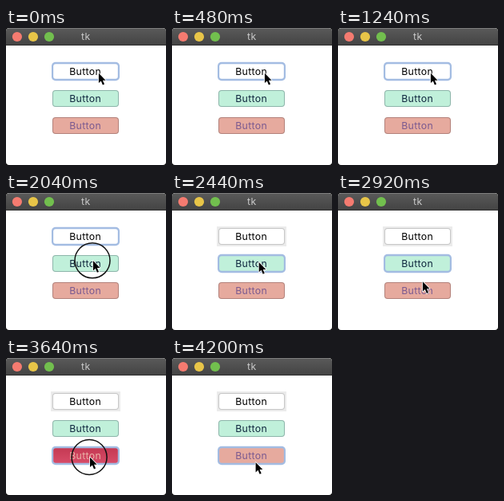
Recreate the animation shown at these times as an HTML page with a canvas. Size 200 by 172 pixels, loop 4.24 s.

```html
<!DOCTYPE html>
<html lang="en">
<head>
<meta charset="utf-8">
<title>tk</title>
<style>
  html, body { margin: 0; width: 100%; height: 100%; overflow: hidden; background: #000; }
  canvas { display: block; width: 200px; height: 172px; border-radius: 4px; background: #fff; }
</style>
</head>
<body>
<canvas></canvas>
<script>
const LOOP = 4240, STEP = 40;
const canvas = document.querySelector('canvas');
const ctx = canvas.getContext('2d');
const ratio = window.devicePixelRatio || 1;
canvas.width = 200 * ratio;
canvas.height = 172 * ratio;
ctx.scale(ratio, ratio);

const BLUE = ['#69a5f8', '#2e74ee'];
const buttons = [
  { y: 44, fill: '#fff', edge: '#c6c6c6', ink: '#000', active: BLUE, activeInk: '#fff', framed: true },
  { y: 78, fill: '#c0f0da', edge: '#8db5aa', ink: '#10283f', active: BLUE, activeInk: '#fff' },
  { y: 112, fill: '#e6aa9e', edge: '#b3827b', ink: '#7b5a90', active: ['#c43852', '#d84d69'], activeInk: '#eab2a7' },
];

// The click ring shows between down and up; the button reacts one or two steps later.
const clicks = [
  { down: 600, up: 1160 },
  { down: 2000, up: 2320 },
  { down: 3240, up: 3680 },
];

// Pointer stops: time, x, y
const path = [
  [1360, 115, 56.5], [1840, 108, 84.8],
  [2360, 108, 84.8], [2840, 105, 110.5],
  [2920, 105, 111], [3200, 104.1, 124.5],
  [4040, 104.1, 124.5], [4200, 103.7, 130.8],
];

const held = (click, t, lag) => t >= click.down + lag && t < click.up + lag;

function pointerAt(t) {
  if (t <= path[0][0]) return path[0].slice(1);
  const next = path.findIndex(stop => stop[0] > t);
  if (next < 0) return path.at(-1).slice(1);
  const [t0, x0, y0] = path[next - 1], [t1, x1, y1] = path[next];
  const p = (t - t0) / (t1 - t0), k = p * p * (3 - 2 * p);
  return [x0 + (x1 - x0) * k, y0 + (y1 - y0) * k];
}

function vertical(y0, y1, colors) {
  const gradient = ctx.createLinearGradient(0, y0, 0, y1);
  colors.forEach((color, i) => gradient.addColorStop(i / (colors.length - 1), color));
  return gradient;
}

function box(x, y, w, h, r, fill) {
  ctx.fillStyle = fill;
  ctx.beginPath();
  ctx.roundRect(x, y, w, h, r);
  ctx.fill();
}

function dot(x, y, r) {
  ctx.beginPath();
  ctx.arc(x, y, r, 0, Math.PI * 2);
}

function label(text, x, y, color) {
  ctx.font = '12.3px Inter, sans-serif';
  ctx.letterSpacing = '0.35px';
  ctx.textAlign = 'center';
  ctx.fillStyle = color;
  ctx.fillText(text, x, y);
}

function drawTitleBar() {
  box(0, 0, 200, 22, 0, vertical(0, 22, ['#5a5a5a', '#434343']));
  box(0, 0, 200, 1, 0, '#7c7c7c');
  box(0, 21, 200, 1, 0, '#303030');
  ['#f57b70', '#e8c548', '#72bf4e'].forEach((color, i) => {
    dot(13.9 + 20.05 * i, 11, 6.1);
    ctx.fillStyle = color;
    ctx.fill();
  });
  label('tk', 99.8, 15.3, '#cacaca');
}

function drawButton(b, focused, pressed) {
  if (focused) box(57, b.y - 1.2, 85, 23.4, 5, '#a3bce2');
  else if (b.framed) box(56, b.y - 2, 87, 25, 0, '#ebebeb');
  if (!focused) box(58, b.y, 83, 21, 4, b.edge);
  const inset = focused ? 1.2 : 1;
  const fill = pressed ? vertical(b.y, b.y + 21, b.active) : b.fill;
  box(58 + inset, b.y + inset, 83 - 2 * inset, 21 - 2 * inset, 3, fill);
  label('Button', 99.2, b.y + 15, pressed ? b.activeInk : b.ink);
}

const arrow = new Path2D('M0 0V12.4L2.9 9.8L5 14.8L7.1 13.9L5 9.1H8.7Z');

function drawPointer(x, y, ring) {
  if (ring) {
    dot(x, y, 22);
    ctx.strokeStyle = '#111';
    ctx.lineWidth = 1.5;
    ctx.stroke();
  }
  ctx.save();
  ctx.translate(x + 0.9, y + 0.2);
  ctx.lineJoin = 'round';
  ctx.lineWidth = 1.6;
  ctx.strokeStyle = '#fff';
  ctx.stroke(arrow);
  ctx.fillStyle = '#000';
  ctx.fill(arrow);
  ctx.restore();
}

function draw(now) {
  const t = Math.floor((now % LOOP) / STEP) * STEP;
  const focus = clicks.reduce((last, c, i) => t >= c.down + STEP * 2 ? i : last, 0);
  ctx.clearRect(0, 0, 200, 172);
  drawTitleBar();
  buttons.forEach((b, i) => drawButton(b, i === focus, held(clicks[i], t, STEP * (t < clicks[i].up ? 2 : 1))));
  drawPointer(...pointerAt(t), clicks.some(c => held(c, t, 0)));
}

const start = performance.now();
function tick() {
  draw(performance.now() - start);
  requestAnimationFrame(tick);
}
tick();
</script>
</body>
</html>
```
